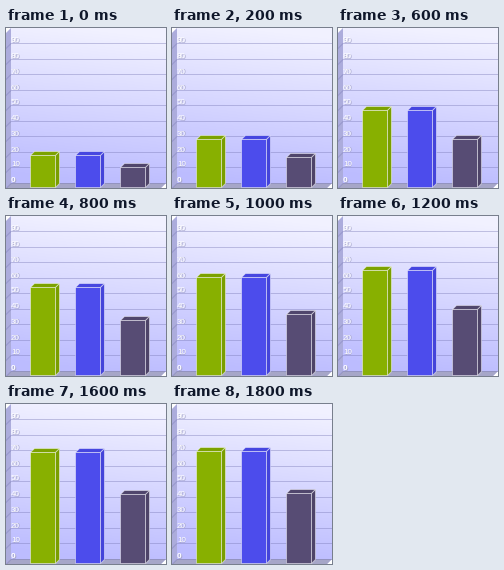
Animation of 160x160 px, one loop 2800 ms. Source, as a matplotlib script:

```python
import numpy as np
import matplotlib.pyplot as plt
from matplotlib.animation import FuncAnimation
from matplotlib.patches import Polygon

SIZE, DPI = 160, 100
PX = 72 / DPI
FRAMES, INTERVAL = 14, 200
DEPTH = 5
BASE = 159.5
WIDTH, DX, DY = 25, 4, 4
# Height of the tallest bars as they ease to rest.
HEIGHTS = [32, 48, 62, 77, 88, 98, 105, 109, 111, 112]
# left edge, height ratio, front, top and side colours
BARS = [
    (24.5, 1.0, "#88b000", "#7ca200", "#7a9e00"),
    (69.5, 1.0, "#4c4cec", "#4646e0", "#4444da"),
    (114.5, 0.625, "#574c74", "#50466c", "#4e4468"),
]

plt.rcParams["toolbar"] = "None"
fig = plt.figure(figsize=(SIZE / DPI, SIZE / DPI), dpi=DPI)
ax = fig.add_axes([0, 0, 1, 1])
ax.axis("off")


def shape(points, color, z, edge="none"):
    return ax.add_patch(Polygon(points, closed=True, facecolor=color,
                                edgecolor=edge, linewidth=0.9 * PX,
                                joinstyle="miter", snap=False, zorder=z))


def draw_backdrop():
    y, x = np.mgrid[0:SIZE, 0:SIZE] / SIZE
    mix = np.clip(1.05 * y - 0.12 * x + 0.05, 0, 1)[..., None]
    light, deep = np.array([241, 241, 255]), np.array([188, 188, 255])
    ax.imshow((light + (deep - light) * mix) / 255,
              extent=(0, SIZE, SIZE, 0), interpolation="nearest", zorder=0)
    inner = SIZE - DEPTH
    shape([(0, 0), (DEPTH, 0), (0, DEPTH)], "white", 1)
    shape([(SIZE, inner), (SIZE, SIZE), (inner, SIZE)], "white", 1)
    shape([(0, DEPTH), (DEPTH, 0), (DEPTH, inner), (0, SIZE)], "#acacdc", 1)
    shape([(0, SIZE), (DEPTH, inner), (SIZE, inner), (inner, SIZE)],
          "#a6a6c8", 1)


def draw_scale():
    for i in range(10):
        y = int(SIZE - DEPTH - 15.5 * i) + 0.5
        ax.plot([0, DEPTH, SIZE], [y + DEPTH, y, y], color="#7878b4",
                alpha=0.4, lw=PX, snap=False, zorder=2)
        for shift, color in ((0.7, "#a8a8cc"), (0, "white")):
            ax.text(DEPTH + shift, y - 1 + shift, str(10 * i),
                    family="Liberation Sans", size=8 * PX, color=color,
                    weight="bold" if i == 0 else "normal",
                    ha="left", va="baseline", zorder=3)


def bar_faces(left, height):
    right, top = left + WIDTH, BASE - height
    front = [(left, BASE), (left, top), (right, top), (right, BASE)]
    lid = [(left, top), (left + DX, top - DY),
           (right + DX, top - DY), (right, top)]
    side = [(right, BASE), (right, top),
            (right + DX, top - DY), (right + DX, BASE - DY)]
    return front, lid, side


def make_bar(left, ratio, *colors):
    faces = [shape(points, color, 5, "#ffffff80")
             for points, color in zip(bar_faces(left, 1), colors)]
    return left, ratio, faces


draw_backdrop()
draw_scale()
bars = [make_bar(*bar) for bar in BARS]
ax.set_xlim(0, SIZE)
ax.set_ylim(SIZE, 0)


def update(frame):
    height = HEIGHTS[min(frame, len(HEIGHTS) - 1)]
    for left, ratio, faces in bars:
        for face, points in zip(faces, bar_faces(left, round(height * ratio))):
            face.set_xy(points)
    return [face for _, _, faces in bars for face in faces]


anim = FuncAnimation(fig, update, frames=FRAMES, interval=INTERVAL,
                     repeat=True, repeat_delay=0, blit=False)
plt.show()
```
